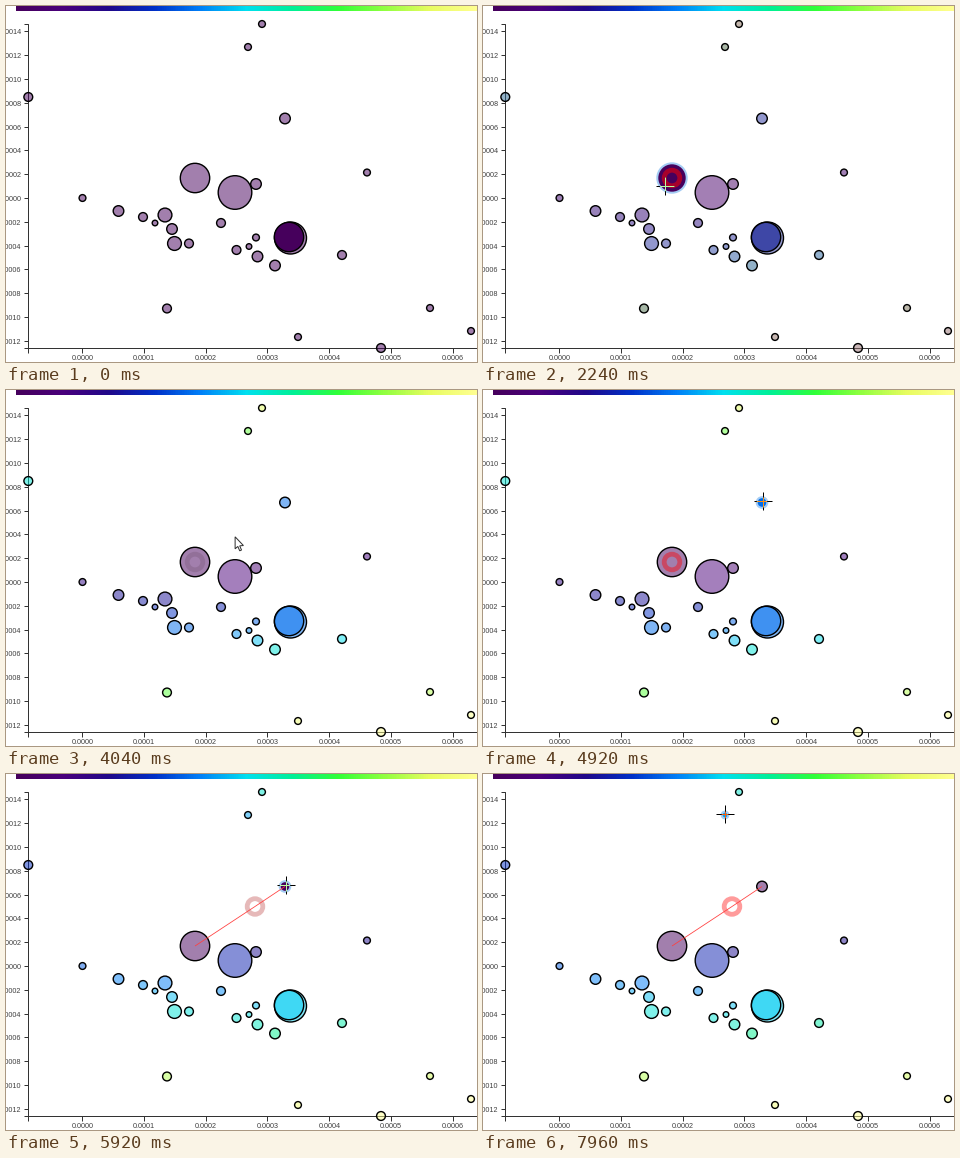
Write a matplotlib script that moves like this. It is 471x356 px and loops after 8 s.

```python
import math
import numpy as np
import matplotlib.pyplot as plt
from matplotlib.animation import FuncAnimation
from matplotlib.colors import LinearSegmentedColormap, to_rgb
from matplotlib.patches import Circle, Polygon

W, H, DPI = 471, 356, 64
STEP, LOOP = 40, 8000
PX = 72 / DPI

CLICK_1, CLICK_2, FADE = 2000, 5113, 500
FIRST, SECOND, MIX = (189, 172), (279, 112.5), (249, 132.5)
TWIN = (283, 231)

# dot centres by radius, large dots below small ones
DOTS = {
    16.8: [(229, 186.5)],
    16: [(284.5, 232)],
    14.7: [FIRST, TWIN],
    6.9: [(159, 209), (168.5, 237.5)],
    5.3: [SECOND, (250, 178), (112.5, 205), (166, 223), (251.5, 250.5),
          (269, 259.5)],
    4.4: [(22.3, 91), (137, 211), (183, 237.5), (215, 217), (230.5, 244),
          (336, 249), (161, 302.5), (375, 342)],
    3.4: [(256, 18), (242, 41), (361, 166.5), (76.5, 192), (250, 231.5),
          (292, 331), (424, 302), (465, 325)],
    2.8: [(149, 217), (243, 240.5)],
}

SCALE = LinearSegmentedColormap.from_list("scale", [
    "#46005c", "#4a007c", "#20088a", "#0030c8", "#0080f8", "#00e0f0",
    "#00f098", "#30ff38", "#90ff40", "#e8fc60", "#ffff90"])

ARROW = np.array([(0, 0), (0, 12), (2.7, 9.6), (4.6, 14),
                  (6.4, 13.2), (4.6, 9), (8.3, 8.7)])


def clamp(u):
    return min(1, max(0, u))


def cubic(u):
    u = clamp(u)
    return 4 * u ** 3 if u < .5 else 1 - 4 * (1 - u) ** 3


def smooth(u):
    u = clamp(u)
    return u * u * (3 - 2 * u)


def blend(a, b, u):
    return np.asarray(a) * (1 - u) + np.asarray(b) * u


fig = plt.figure(figsize=(W / DPI, H / DPI), dpi=DPI, facecolor="white")
ax = fig.add_axes([0, 0, 1, 1])
ax.axis("off")


def seg(x, y, color="black", width=1, z=1):
    return ax.plot(x, y, color=color, lw=width * PX, zorder=z,
                   solid_capstyle="butt")[0]


def label(x, y, text, side):
    ax.text(x, y, text, fontsize=7.3 * PX, family="Liberation Sans",
            color="#404040", ha=side, va="center_baseline")


def draw_axes():
    ax.imshow(np.linspace(0, 1, 461)[None, :], cmap=SCALE,
              extent=(10, W, 5.5, 0), aspect="auto")
    gray = "#333333"
    seg([18, 22, 22, 18], [18, 18, 342, 342], gray)
    seg([22, 22, W], [347, 342, 342], gray)
    for i in range(-6, 8):
        y = 192 - 23.8 * i
        seg([18, 22], [y, y], gray)
        sign = "-" if i < 0 else ""
        label(15.5, y + .5, f"{sign}{abs(i) * .0002:.4f}", "right")
    for i in range(7):
        x = 76.3 + 61.7 * i
        seg([x, x], [342, 347], gray)
        label(x + .3, 351.5, f"{i * .0001:.4f}", "center")


draw_axes()
ax.set_xlim(0, W)
ax.set_ylim(H, 0)
ax.set_aspect("auto")

spots = [(x, y, r) for r, group in DOTS.items() for x, y in group]
centres = np.array([s[:2] for s in spots])
picked = np.array([s[:2] in (FIRST, SECOND) for s in spots])


def colors_from(ref):
    """Colours by distance from a reference point, mostly along y."""
    dist = np.abs(centres - ref) @ (.09, 1)
    return SCALE(np.clip(1.04 * dist / dist.max(), 0, 1))[:, :3]


near = np.tile(SCALE(0.0)[:3], (len(spots), 1))
by_first = colors_from(FIRST)
by_mix = np.where(picked[:, None], near, colors_from(MIX))

discs = [ax.add_patch(Circle((x, y), r, zorder=3)) for x, y, r in spots]
twin = [s[:2] for s in spots].index(TWIN)
ring = ax.add_patch(Circle(FIRST, 7.8, fill=False, lw=4.8 * PX, zorder=4))
links = [seg([], [], "#ff4040", .8, 5) for _ in range(2)]
cross = [seg([], [], "black", 1, 6) for _ in range(2)]
inner = [seg([], [], "white", 1, 7) for _ in range(2)]
arrow = ax.add_patch(Polygon(ARROW, closed=True, fc="white", ec="#303030",
                             lw=PX, zorder=8))


def pointer(t):
    if t < 600:
        return None
    if t < 3660:
        u = 1 - (1 - clamp((t - 560) / 680)) ** 2
        return blend((478, 26), (182, 180), u)
    if t < 6240:
        return blend((182, 180), (280, 111), smooth((t - 3660) / 780))
    u = smooth((t - 6240) / 1020)
    bend = 7 * math.sin(math.pi * u)
    return blend((280, 111), (242, 40), u) - (bend, 0)


def dot_under(pos):
    if pos is None:
        return None
    for n, (x, y, r) in enumerate(spots):
        if math.hypot(pos[0] - x, pos[1] - y) < r:
            return n
    return None


def paint_dots(t, over):
    u = cubic((t - CLICK_1) / FADE)
    v = cubic((t - CLICK_2) / FADE)
    colors = blend(blend(near, by_first, u), by_mix, v)
    for n, disc in enumerate(discs):
        hot = n == over
        # the twin starts out as the picked dot
        alpha = 1 if hot else 1 - u / 2 if n == twin else .5
        disc.set_facecolor((*colors[n], alpha))
        disc.set_edgecolor(to_rgb("#a4ccf4" if hot else "black"))
        disc.set_linewidth((2 if hot else 1.4) * PX)


def paint_links(t):
    u = cubic((t - CLICK_2) / FADE)
    for line, start in zip(links, (FIRST, SECOND)):
        end = blend(start, MIX, u)
        line.set_data([start[0], end[0]], [start[1], end[1]])
        line.set_visible(u > 0)


def paint_ring(t):
    k = .5 + .5 * math.cos(2 * math.pi * (t - 130) / 700)
    ring.set_visible(CLICK_1 <= t < CLICK_2 or t >= CLICK_2 + FADE)
    ring.center = FIRST if t < CLICK_2 else MIX
    ring.set_edgecolor((min(1, 1.5 * k), 0, 0, .08 + .45 * k))


def paint_pointer(t, pos, over):
    crossed = over is not None and not 2960 <= t < 3520
    arrow.set_visible(pos is not None and not crossed)
    for line in cross + inner:
        line.set_visible(crossed)
    if pos is None:
        return
    arrow.set_xy(ARROW + pos)
    if not crossed:
        return
    x, y = pos
    cross[0].set_data([x - 9, x + 9], [y, y])
    cross[1].set_data([x, x], [y - 9, y + 9])
    # the cross shows inverted colours where it lies on the dot
    disc = discs[over]
    color = 1 - np.array(disc.get_facecolor()[:3])
    for line, arm in zip(inner, cross):
        line.set_data(*arm.get_data())
        line.set_color(color)
        line.set_clip_path(disc)


def draw(i):
    t = i * STEP
    pos = pointer(t)
    over = dot_under(pos)
    paint_dots(t, over)
    paint_links(t)
    paint_ring(t)
    paint_pointer(t, pos, over)
    return []


anim = FuncAnimation(fig, draw, frames=LOOP // STEP, interval=STEP,
                     init_func=lambda: draw(0), repeat=True,
                     repeat_delay=0, blit=False)
plt.show()
```
